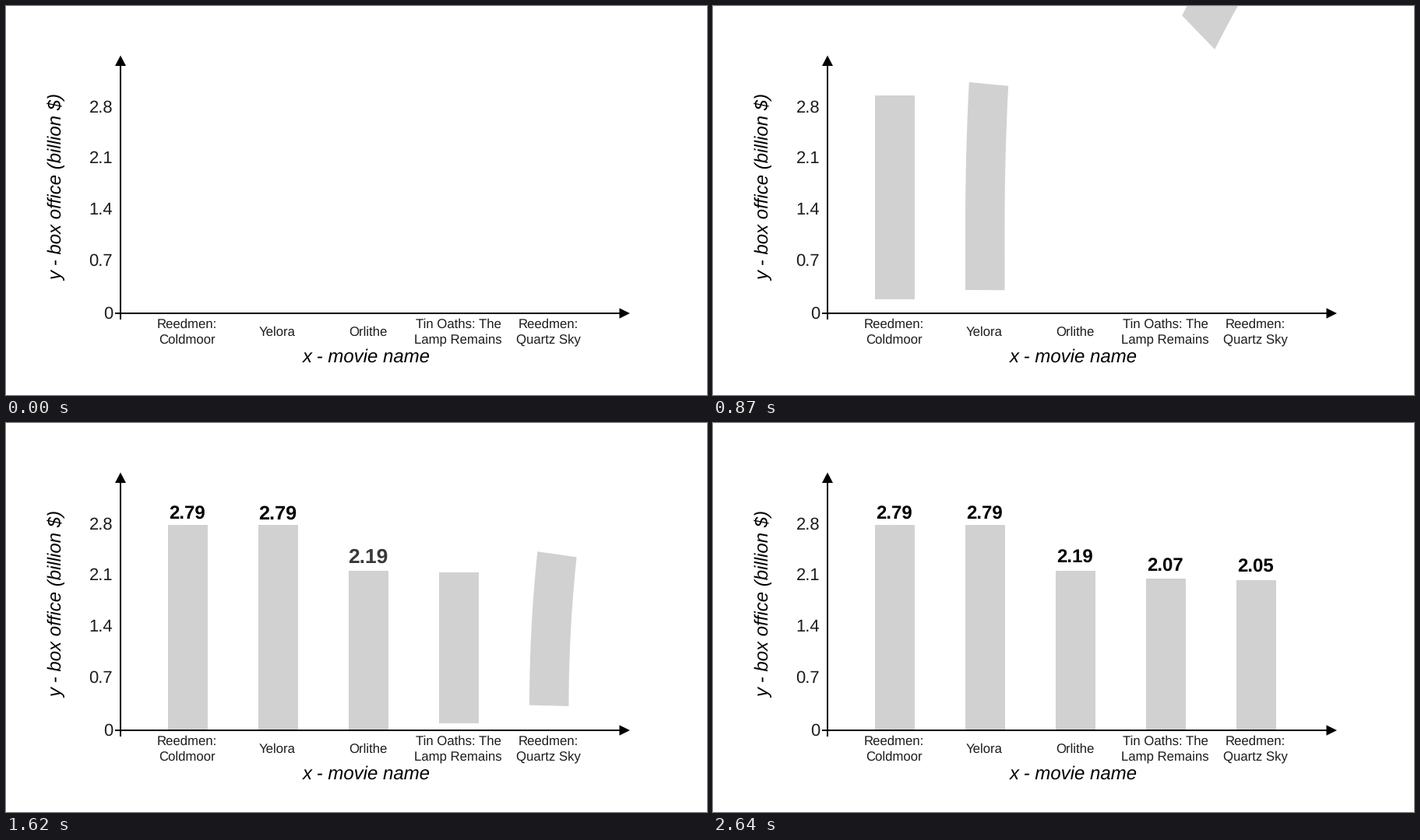
A matplotlib script that plays this animation: 900 px wide and 500 px high, repeating every 5310 ms.

```python
import matplotlib.pyplot as plt
import numpy as np
from matplotlib.animation import FuncAnimation
from matplotlib.patches import Polygon

plt.rcParams["font.family"] = "Liberation Sans"
plt.rcParams["text.hinting"] = "none"
plt.rcParams["toolbar"] = "None"

W, H, DPI = 900, 500, 100
STEP, FRAMES = 30, 177
BASE, BAR_W = 393.5, 50.5
INK = "#1c1c1c"

# left edge, top, value, landing time, label start, label baseline, name lines
BARS = [
    (208, 131, "2.79", 705, 985, 123.5, ["Reedmen:", "Coldmoor"]),
    (324, 131, "2.79", 853, 1258, 123.5, ["Yelora"]),
    (440, 189.5, "2.19", 1080, 1550, 179.7, ["Orlithe"]),
    (556, 200, "2.07", 1350, 1770, 190.5, ["Tin Oaths: The", "Lamp Remains"]),
    (672, 202, "2.05", 1620, 2160, 192, ["Reedmen:", "Quartz Sky"]),
]
POP, SHRINK, PEAK = 90, 390, 1.17

fig = plt.figure(figsize=(W / DPI, H / DPI), dpi=DPI, facecolor="white")
ax = fig.add_axes([0, 0, 1, 1])
ax.set_xlim(0, W)
ax.set_ylim(H, 0)
ax.axis("off")


def pt(px):
    return px * 72 / DPI


def write(x, y, s, px, **kw):
    kw = {"ha": "center", "va": "baseline", "color": "black", **kw}
    return ax.text(x, y, s, fontsize=pt(px), **kw)


def draw_axes():
    line = dict(color="black", lw=pt(2), solid_capstyle="butt", zorder=4)
    ax.plot([147, 147], [74, 402.5], **line)
    ax.plot([140, 790], [395, 395], **line)
    for tip in ([(147, 63.5), (140, 77), (154, 77)],
                [(801, 395), (787.5, 388.3), (787.5, 401.7)]):
        ax.add_patch(Polygon(tip, fc="black", ec="none", zorder=4))
    for s, y in (("2.8", 137), ("2.1", 202), ("1.4", 268), ("0.7", 334), ("0", 402)):
        write(137, y, s, 22, ha="right", color=INK)
    write(462.5, 458, "x - movie name", 24, style="italic")
    write(77, 232.5, "y - box office (billion $)", 24, style="italic",
          rotation=90, ha="right", va="center")
    for x, *_, lines in BARS:
        first = 424 if len(lines) == 1 else 413.6
        for i, s in enumerate(lines):
            write(x + 24.5, first + 20 * i, s, 16.8, color=INK)


def bar_shape(x, top, q):
    """Outline of a bar q ms before it lands; it swoops in bent, then settles."""
    s = np.linspace(0, 1, 30)
    y = BASE + (top - BASE) * s
    lead = q + (53 + 0.12 * max(q - 45, 0)) * s
    dx = 0.00368 * np.maximum(lead, 0) ** 2
    tilt = 0.0039 * np.maximum(lead + 30, 0) ** 1.7
    drop = 0.08 * max(q + 370, 0) + 0.101 * max(q, 0) ** 1.49
    left = np.column_stack([x + dx, y - drop - tilt])
    right = np.column_stack([x + BAR_W + dx - tilt ** 2 / 220, y - drop])
    return np.vstack([left, right[::-1]])


def label_state(age):
    """Scale and opacity of a value label."""
    if age <= 0:
        return 1, 0
    if age < POP:
        k = age / POP
        return 0.85 + (PEAK - 0.85) * k, k
    return 1 + (PEAK - 1) * max(0, 1 - (age - POP) / SHRINK), 1


draw_axes()
shapes, labels = [], []
for x, top, value, land, start, baseline, _ in BARS:
    bar = Polygon([(0, 0)] * 3, fc="#d1d1d1", ec="none", zorder=2)
    shapes.append(ax.add_patch(bar))
    labels.append(write(x + 24.7, baseline, value, 24, weight="bold", zorder=5))


def update(n):
    t = n * STEP
    for bar, label, (x, top, _, land, start, *_) in zip(shapes, labels, BARS):
        q = land - t
        bar.set_visible(q < 270)
        bar.set_xy(bar_shape(x, top, q))
        scale, alpha = label_state(t - start)
        label.set_fontsize(pt(24 * scale))
        label.set_alpha(alpha)
    return shapes + labels


anim = FuncAnimation(fig, update, frames=FRAMES, interval=STEP,
                     repeat=True, repeat_delay=0, blit=False)
plt.show()
```
